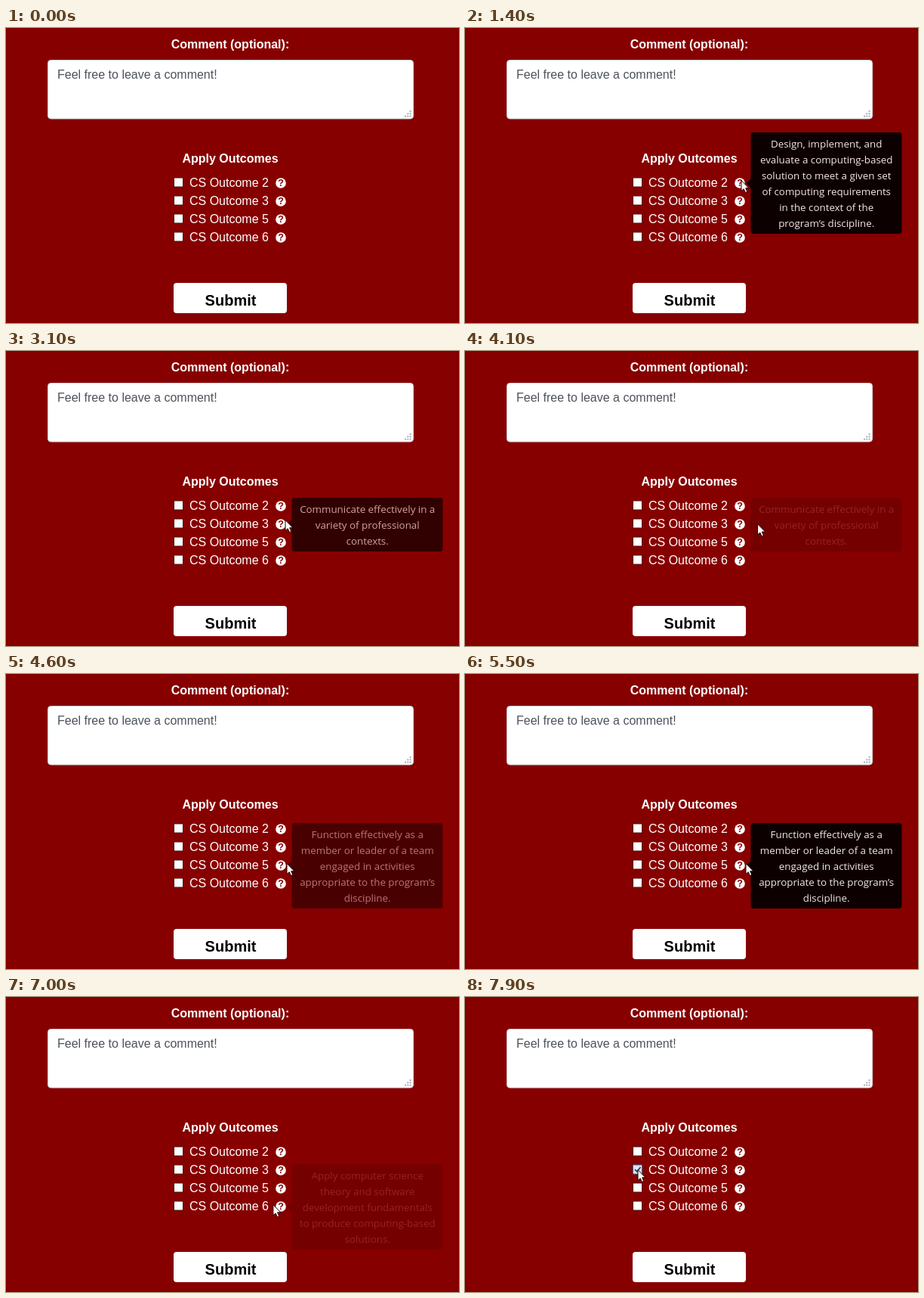
Recreate the animation shown at these times as an HTML page with a canvas. Size 600 by 390 pixels, loop 8000 ms.

```html
<!DOCTYPE html>
<html lang="en">
<head>
<meta charset="utf-8">
<title>Apply Outcomes</title>
<style>
  html, body { margin: 0; width: 100%; height: 100%; overflow: hidden; background: #870000; }
  canvas { display: block; }
</style>
</head>
<body>
<canvas id="stage" width="600" height="390"></canvas>
<script>
const W = 600, H = 390, LOOP = 8000, STEP = 100;
const RED = '#870000';
const SANS = '"Liberation Sans", Arial, sans-serif';
const TIP_FONT = '13.35px "Open Sans", "Noto Sans", sans-serif';
const FADE = 200;

const ctx = document.getElementById('stage').getContext('2d');
const layer = document.createElement('canvas');
layer.width = W;
layer.height = H;
const tipCtx = layer.getContext('2d');

const tips = [
  'Design, implement, and|evaluate a computing-based|solution to meet a given set|of computing requirements|in the context of the|program’s discipline.',
  'Communicate effectively in a|variety of professional|contexts.',
  'Function effectively as a|member or leader of a team|engaged in activities|appropriate to the program’s|discipline.',
  'Apply computer science|theory and software|development fundamentals|to produce computing-based|solutions.'
];
const rows = [2, 3, 5, 6].map((n, i) => ({ n, y: 204.5 + 24 * i, lines: tips[i].split('|') }));

// The pointer enters from below, visits each help icon, then ticks a box.
const entry = { x: 440, y: 410 };
const glides = [
  { from: 750, to: 1250, x: 366, y: 201, bulge: 0 },
  { from: 1900, to: 3060, x: 370, y: 223, bulge: 24 },
  { from: 3900, to: 4600, x: 372, y: 250, bulge: 22 },
  { from: 5500, to: 6110, x: 367, y: 279, bulge: 10 },
  { from: 6800, to: 7850, x: 229, y: 228, bulge: 0 }
];

const clamp = v => Math.min(1, Math.max(0, v));
const ease = u => u * u * (3 - 2 * u);

function pointerAt(t) {
  let pos = entry;
  for (const g of glides) {
    if (t < g.from) break;
    const u = clamp((t - g.from) / (g.to - g.from)), k = ease(u);
    pos = {
      x: pos.x + (g.x - pos.x) * k + g.bulge * Math.sin(Math.PI * u),
      y: pos.y + (g.y - pos.y) * k
    };
  }
  return pos;
}

// A tooltip opens just before the pointer settles and closes as it leaves.
function tipAlpha(i, t) {
  const open = glides[i].to - 100, close = glides[i + 1].from + 30;
  return clamp((t - open) / FADE) * clamp(1 - (t - close) / FADE);
}

function text(c, str, x, y, font, color, align = 'center') {
  c.font = font;
  c.fillStyle = color;
  c.textAlign = align;
  c.fillText(str, x, y);
}

function box(c, x, y, w, h, r, fill, stroke) {
  c.beginPath();
  c.roundRect(x, y, w, h, r);
  c.fillStyle = fill;
  c.fill();
  if (stroke) {
    c.lineWidth = 1;
    c.strokeStyle = stroke;
    c.stroke();
  }
}

function drawForm() {
  ctx.fillStyle = RED;
  ctx.fillRect(0, 0, W, H);
  text(ctx, 'Comment (optional):', 297, 27, `bold 16px ${SANS}`, '#fff');
  box(ctx, 55.5, 42.5, 484, 77.5, 4, '#fff', '#ced4da');
  text(ctx, 'Feel free to leave a comment!', 68, 66.7, `16px ${SANS}`, '#4d525c', 'left');
  ctx.fillStyle = '#a9adb8';
  for (let r = 0; r < 3; r++) {
    for (let c = 2 - r; c < 3; c++) ctx.fillRect(528 + c * 3.3, 109 + r * 3.3, 2, 2);
  }
  text(ctx, 'Apply Outcomes', 297, 178, `bold 16px ${SANS}`, '#fff');
  box(ctx, 222, 337, 150, 40, 4, '#fff');
  text(ctx, 'Submit', 297.5, 367.3, `bold 20px ${SANS}`, '#000');
}

function drawRow({ n, y }, hover, checked) {
  box(ctx, 222.5, y - 6.5, 12, 12, 0, hover ? '#d5e8f8' : '#fff', hover ? '#2d6ea8' : '#4a1010');
  if (checked) {
    ctx.beginPath();
    ctx.moveTo(225, y - .5);
    ctx.lineTo(227.7, y + 2.3);
    ctx.lineTo(232.5, y - 3.5);
    ctx.lineWidth = 1.6;
    ctx.strokeStyle = '#16385c';
    ctx.stroke();
  }
  text(ctx, `CS Outcome ${n}`, 243, y + 5.5, `16px ${SANS}`, '#fff', 'left');
  ctx.beginPath();
  ctx.arc(364, y + .5, 6.8, 0, Math.PI * 2);
  ctx.fillStyle = '#fff';
  ctx.fill();
  text(ctx, '?', 364.1, y + 4.9, `bold 12.5px ${SANS}`, RED);
}

function drawTip({ y, lines }, alpha) {
  const h = lines.length * 21 + 8, mid = y + .5, top = Math.round(mid - h / 2);
  tipCtx.clearRect(0, 0, W, H);
  box(tipCtx, 378.5, top, 200, h, 4, '#000');
  tipCtx.beginPath();
  tipCtx.moveTo(379, mid - 6.4);
  tipCtx.lineTo(372.3, mid);
  tipCtx.lineTo(379, mid + 6.4);
  tipCtx.fill();
  lines.forEach((s, i) => text(tipCtx, s, 478.7, top + 20 + i * 21, TIP_FONT, '#fff'));
  ctx.globalAlpha = alpha * .9;
  ctx.drawImage(layer, 0, 0);
  ctx.globalAlpha = 1;
}

function drawPointer({ x, y }) {
  ctx.save();
  ctx.translate(x, y + .5);
  ctx.fillStyle = '#fff';
  ctx.strokeStyle = '#200';
  ctx.lineWidth = 1;
  const arrow = new Path2D('M0 0V14L3.2 11.2 5.4 16 7.8 15 5.7 10.2H10Z');
  ctx.fill(arrow);
  ctx.stroke(arrow);
  ctx.restore();
}

function draw(t) {
  const p = pointerAt(t), ticked = t >= glides[4].to;
  drawForm();
  for (const row of rows) {
    const hover = Math.abs(p.x - 229) < 6.5 && Math.abs(p.y - row.y) < 6.5;
    drawRow(row, hover, ticked && row.n === 3);
  }
  rows.forEach((row, i) => {
    const alpha = tipAlpha(i, t);
    if (alpha > 0) drawTip(row, alpha);
  });
  drawPointer(p);
}

const start = performance.now();
function tick() {
  const t = (performance.now() - start) % LOOP;
  draw(Math.floor(t / STEP) * STEP);
  requestAnimationFrame(tick);
}
tick();
</script>
</body>
</html>
```
